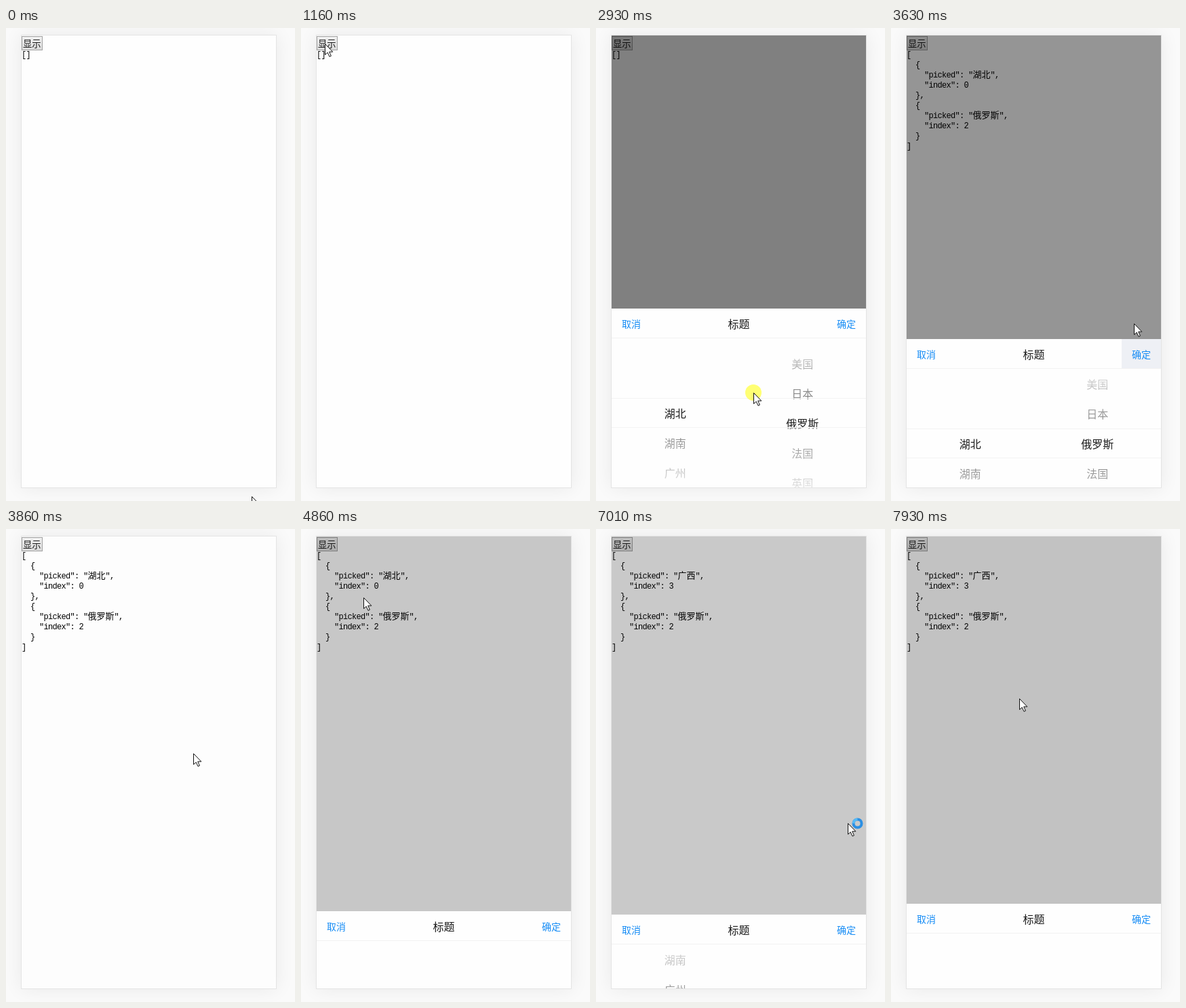
An HTML page for the animation above (8 s loop, 426 by 698 pixels).

```html
<!DOCTYPE html>
<html lang="zh-CN">
<head>
<meta charset="utf-8">
<style>
html, body { margin: 0; width: 100%; height: 100%; overflow: hidden; background: #fafafa; }
body { position: relative; font-family: "Noto Sans CJK SC", "Noto Sans CJK", sans-serif; color: #1c1c1c; }
body * { position: absolute; box-sizing: border-box; }
#phone { left: 22px; top: 10px; width: 377px; height: 669px; border: 1px solid #e4e4e4;
  background: #fefefe; box-shadow: 0 0 26px rgba(0,0,0,.07); overflow: hidden; }
#show { left: 0; top: 1px; width: 31px; height: 21px; border: 1px solid #a2a2a2;
  background: linear-gradient(#f0f0f0, #dcdcdc); font-size: 13.33px; line-height: 19px; white-space: nowrap; }
#show span { left: 1px; }
#json { left: 0; top: 22px; margin: 0; color: #000; font: 12px/15px "Liberation Mono", monospace; letter-spacing: -.7px; }
#json span { position: static; font: 13px/0 "Noto Sans CJK SC", "Noto Sans CJK", sans-serif; letter-spacing: 0; }
#shade { inset: 0; background: #000; }
#popup { left: 0; top: 403px; width: 375px; height: 264px; background: #fefefe; overflow: hidden; }
#head { width: 100%; height: 44px; border-bottom: 1px solid #f2f2f2; line-height: 44px;
  text-align: center; font-size: 16px; }
#head b { font-weight: 400; left: 0; right: 0; }
#head i { font-style: normal; font-size: 14px; color: #168cf5; width: 58px; height: 43px; }
#wheels { top: 44px; width: 100%; height: 220px; overflow: hidden; }
.wheel { top: 88px; width: 50%; font-size: 16px; line-height: 44px; text-align: center; }
.wheel + .wheel { left: 50%; }
.wheel div { position: static; height: 44px; }
.mask { width: 100%; height: 89px; }
#above { top: 0; border-bottom: 1px solid #f3f3f3;
  background: linear-gradient(to top, rgba(254,254,254,.45), rgba(254,254,254,.87)); }
#below { top: 131px; border-top: 1px solid #f3f3f3;
  background: linear-gradient(rgba(254,254,254,.45), rgba(254,254,254,.87)); }
#cursor { left: 0; top: 0; overflow: visible; }
</style>
</head>
<body>
<div id="phone">
  <div id="show"><span>显示</span></div>
  <pre id="json"></pre>
  <div id="shade"></div>
  <div id="popup">
    <div id="head"><b>标题</b><i style="left:0">取消</i><i id="ok" style="right:0">确定</i></div>
    <div id="wheels">
      <div class="wheel"></div>
      <div class="wheel"></div>
      <div class="mask" id="above"></div>
      <div class="mask" id="below"></div>
    </div>
  </div>
</div>
<svg id="cursor" width="24" height="24">
  <circle id="spot" r="12" fill="#ff0" fill-opacity=".55"/>
  <path d="M.5 .5V16.5L4.2 13.2L7 19.3L9.4 18.2L6.7 12.2H11.8Z" fill="#fff" stroke="#111"/>
  <g id="busy" fill="none" stroke-width="4">
    <circle cx="14.5" cy=".5" r="6" stroke="#2b8fe3"/>
    <path d="M8.5 .5A6 6 0 0 1 14.5 -5.5" stroke="#57b9f4"/>
  </g>
</svg>
<script>
const $ = id => document.getElementById(id);
const LOOP = 8000, FADE = 300, ROW = 44, PANEL = 264;
const lists = [
  ['湖北', '湖南', '广州', '广西', '福建', '江西'],
  ['美国', '日本', '俄罗斯', '法国', '英国']
];
const wheels = [...document.querySelectorAll('.wheel')];
const button = { x: 35, y: 23 }, grabY = 611;

// Each visit: tap the button, pass "via", drag one wheel by some rows, confirm.
const visits = [
  { open: 1270, grab: 2600, drop: 3000, close: 3588, col: 1, rows: 2, x: 232,
    via: { t: 1930, x: 344, y: 492 }, ok: { x: 358, y: 436 } },
  { open: 4783, grab: 5400, drop: 5750, close: 6909, col: 0, rows: 3, x: 107,
    via: { t: 4860, x: 92, y: 100 }, ok: { x: 371, y: 434 }, busy: true },
  { open: 7847, grab: 8600, drop: 9000, close: 9600, col: 1, rows: 1, x: 300,
    via: { t: 7930, x: 189, y: 249 }, ok: { x: 358, y: 436 } }
];

const clamp = v => Math.min(1, Math.max(0, v));
const within = (t, a, span) => t >= a && t < a + span;
const show = (el, on) => el.style.visibility = on ? 'visible' : 'hidden';

const stops = [{ t: 0, x: 362, y: 692 }];
for (const v of visits) {
  const rest = { x: v.x, y: grabY - v.rows * ROW };
  stops.push(
    { t: v.open - 430, ...button }, { t: v.open - 90, ...button }, v.via,
    { t: v.grab, x: v.x, y: grabY }, { t: v.drop, ...rest },
    { t: Math.max(v.drop, v.close - 600), ...rest },
    { t: v.close - 140, ...v.ok }, { t: v.close + 105, ...v.ok });
}

function pointer(t) {
  const n = stops.findIndex(s => s.t > t), a = stops[n - 1], b = stops[n];
  const f = (t - a.t) / (b.t - a.t);
  return ['x', 'y'].map(k => Math.round(a[k] + (b[k] - a[k]) * f));
}

// CSS "ease" curve, solved by bisection
function ease(x) {
  x = clamp(x);
  let lo = 0, hi = 1, s;
  for (let i = 0; i < 20; i++) {
    s = (lo + hi) / 2;
    if (.75 * s * (1 - s) + s ** 3 < x) lo = s; else hi = s;
  }
  return .3 * s * (1 - s) ** 2 + 3 * s * s * (1 - s) + s ** 3;
}

const openness = t => visits.reduce((sum, v) =>
  sum + ease((t - v.open) / FADE) - ease((t - v.close) / FADE), 0);

const pressed = (t, v) => within(t, v.open - 300, 90) || within(t, v.grab, v.drop - v.grab)
  || within(t, v.close - 140, 140);

// Confirmed choices stay until the same wheel is moved again.
function result(t) {
  const done = visits.filter(v => t >= v.close), chosen = [0, 0];
  done.forEach(v => chosen[v.col] = v.rows);
  return done.length ? chosen.map((index, col) => ({ picked: lists[col][index], index })) : [];
}

function draw() {
  const t = (performance.now() - start) % LOOP;
  const open = openness(t);
  const visit = visits.findLast(v => t >= v.open);

  $('json').innerHTML = JSON.stringify(result(t), null, 2).replace(/[^\x00-\xff]+/g, '<span>$&</span>');
  $('shade').style.opacity = open / 2;
  $('popup').style.transform = `translateY(${Math.round(PANEL * (1 - open))}px)`;
  $('ok').style.background = visit && within(t, visit.close, 90) ? '#eef0f5' : '';
  wheels.forEach((wheel, col) => {
    const moved = visit && visit.col === col
      ? visit.rows * ROW * clamp((t - visit.grab) / (visit.drop - visit.grab)) : 0;
    wheel.style.transform = `translateY(${-Math.round(moved)}px)`;
  });

  const [x, y] = pointer(t);
  $('cursor').style.transform = `translate(${x}px, ${y}px)`;
  show($('spot'), visits.some(v => pressed(t, v)));
  show($('busy'), visit && visit.busy && within(t, visit.close, 240));
  requestAnimationFrame(draw);
}

wheels.forEach((wheel, col) => wheel.innerHTML = lists[col].map(s => `<div>${s}</div>`).join(''));
const start = performance.now();
draw();
</script>
</body>
</html>
```
